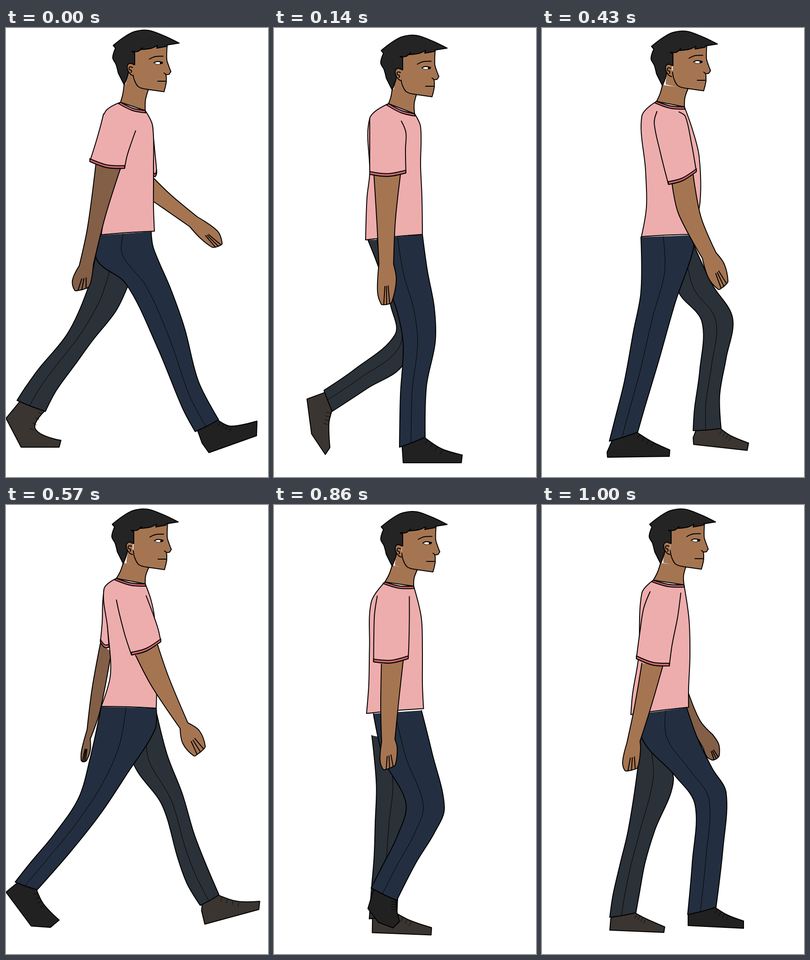
An HTML page with a canvas that plays this animation: 572 by 979 pixels, repeating every 1140 ms.

```html
<!DOCTYPE html>
<html lang="en">
<head>
<meta charset="utf-8">
<title>Walk cycle</title>
<style>
html, body { margin: 0; width: 100%; height: 100%; overflow: hidden; background: #fff; }
canvas { display: block; }
</style>
</head>
<body>
<canvas id="stage" width="572" height="979"></canvas>
<script>
const ctx = document.getElementById('stage').getContext('2d');
const LOOP = 1140;
const SKIN = '#a57552', SHADE = '#835f47', PINK = '#eeadad', TRIM = '#c7686d', HAIR = '#242424';
const NEAR = { cloth: '#232f40', shoe: '#212121' };
const FAR = { cloth: '#2b3138', shoe: '#3b3531' };

// Edges are flat x, y runs. Limbs: back edge downwards, front edge downwards (legs) or upwards (arms, sleeves).
// Hands: back knuckle, back tip, front tip, front knuckle. Shoes: heel, ball, toe, toe top, instep.
const strideBody = {
  face: [0, 0], hair: [0, 0],
  torso: { back: [250,162, 215,186, 218,280, 220,350, 208,451], front: [304,180, 320,213, 322,310, 322,390, 324,443] },
  sleeve: { back: [213,187, 206,215, 196,250, 183,291], front: [259,306, 264,280, 273,252, 283,224] },
  arm: { color: SHADE, back: [196,298, 178,435, 160,518], hand: [145,550, 150,572, 181,564, 187,545], front: [191,515, 217,410, 250,306] }
};
const strideFarArm = {
  farArm: { color: SKIN, back: [323,379, 365,408, 401,433], hand: [424,458, 450,478, 472,470, 462,443], front: [418,412, 360,364, 320,325] },
  farSleeve: { back: [320,213, 322,245, 322,285, 322,321], front: [329,315, 328,300, 325,270, 321,230] }
};
const strideLegs = {
  near: { back: [206,452, 198,505, 262,558, 330,695, 385,828, 413,880], front: [317,444, 322,480, 360,570, 390,655, 420,770, 464,854], shoe: [428,905, 443,926, 547,889, 548,857, 490,868] },
  far: { back: [196,494, 178,570, 135,665, 70,745, 40,787, 24,812], front: [267,560, 240,617, 190,680, 150,735, 110,790, 86,836], shoe: [0,851, 33,914, 116,914, 120,899, 64,874] }
};

const passBody = {
  face: [0, 11], hair: [0, 11],
  torso: { back: [250,165, 209,197, 209,317, 203,370, 200,462], front: [307,187, 320,215, 320,300, 323,370, 324,450] },
  sleeve: { back: [209,197, 209,235, 209,275, 209,319], front: [288,316, 287,265, 288,228, 278,203] },
  arm: { back: [218,318, 225,430, 229,515], hand: [226,575, 234,602, 257,598, 267,550], front: [261,515, 265,420, 276,320] }
};
const passLegs = {
  near: { back: [225,460, 240,540, 268,615, 282,690, 276,800, 274,914], front: [324,450, 335,530, 350,610, 352,685, 333,780, 330,892], shoe: [281,932, 282,948, 409,948, 411,931, 365,917] },
  far: { back: [205,462, 228,521, 256,610, 264,669, 175,745, 109,790], front: [300,460, 300,540, 300,620, 283,732, 205,785, 127,836], shoe: [72,809, 82,885, 112,930, 122,915, 120,862] }
};
const swingFar = { back: [240,500, 260,590, 268,680, 262,760, 250,810, 240,846], front: [320,500, 345,590, 360,655, 342,735, 312,800, 288,868], shoe: [232,885, 262,910, 305,930, 318,920, 300,888] };

const stepBody = {
  face: [8, -2], hair: [5, 2],
  torso: { back: [250,160, 218,192, 226,310, 228,390, 217,455], front: [311,172, 328,220, 343,280, 345,380, 328,450] },
  sleeve: { back: [251,182, 245,207, 258,270, 276,341], front: [337,313, 326,250, 313,193, 299,183] },
  arm: { back: [284,340, 298,405, 350,502], hand: [364,546, 385,570, 406,552, 398,515], front: [380,490, 347,412, 330,320] }
};
const stepLegs = {
  near: { back: [216,456, 216,575, 200,660, 180,770, 160,850, 147,901], front: [324,452, 331,480, 292,595, 255,725, 225,825, 209,881], shoe: [142,925, 143,936, 278,934, 279,920, 240,902] },
  far: { back: [300,510, 297,573, 349,640, 344,750, 333,830, 330,878], front: [330,470, 372,560, 416,632, 402,720, 388,800, 391,873], shoe: [330,893, 331,908, 448,921, 451,905, 412,889] }
};

const strideBody2 = {
  face: [1, 2], hair: [-2, 4],
  torso: { back: [241,160, 214,183, 222,270, 228,370, 208,439], front: [304,172, 316,205, 324,245, 329,380, 328,443] },
  sleeve: { back: [241,207, 247,235, 260,285, 274,327], front: [338,298, 332,270, 320,235, 306,198] },
  arm: { back: [283,328, 318,395, 380,487], hand: [386,520, 410,547, 435,526, 422,492], front: [397,475, 355,375, 331,305] }
};
const strideFarArm2 = {
  farArm: { color: SHADE, back: [206,302, 188,400, 177,490], hand: [165,535, 164,557, 176,557, 184,535], front: [184,510, 205,450, 230,320] },
  farSleeve: { back: [214,183, 211,215, 210,255, 206,299], front: [225,310, 222,270, 220,230, 219,200] }
};
const strideLegs2 = {
  near: { back: [208,440, 183,555, 158,640, 105,718, 55,778, 20,822], front: [328,443, 325,490, 265,585, 205,675, 140,757, 68,839], shoe: [0,844, 55,918, 97,921, 116,905, 82,870] },
  far: { back: [290,500, 277,560, 341,655, 375,770, 395,825, 424,873], front: [329,455, 352,545, 385,630, 410,715, 435,780, 465,850], shoe: [427,885, 434,914, 552,882, 554,864, 505,864] }
};

const passBody2 = {
  face: [1, 13], hair: [-1, 15],
  torso: { back: [241,172, 207,230, 206,290, 216,370, 210,452], front: [300,180, 322,240, 325,300, 328,380, 333,447] },
  sleeve: { back: [215,208, 217,250, 222,300, 229,349], front: [308,319, 305,298, 295,258, 288,207] },
  arm: { back: [251,348, 264,440, 285,513], hand: [287,552, 296,574, 321,560, 323,525], front: [314,507, 306,420, 300,330] }
};
const passLegs2 = {
  near: { back: [208,452, 222,535, 260,645, 250,672, 160,735, 90,790], front: [325,452, 340,530, 345,620, 350,711, 235,768, 117,836], shoe: [63,812, 80,890, 106,935, 126,922, 119,872] },
  far: { back: [212,500, 240,630, 254,672, 267,750, 270,830, 268,906], front: [300,500, 320,600, 330,680, 334,740, 331,820, 332,890], shoe: [280,907, 281,938, 420,943, 420,923, 370,911] }
};
const swingNear = { back: [217,455, 240,555, 288,650, 270,720, 235,790, 212,835], front: [322,448, 345,540, 372,660, 350,715, 310,780, 268,862], shoe: [205,880, 228,910, 260,922, 274,908, 267,880] };

const stepBody2 = {
  face: [3, 1], hair: [1, 4],
  torso: { back: [243,164, 218,192, 211,330, 198,410, 194,457], front: [310,174, 321,250, 323,330, 320,400, 320,441] },
  sleeve: { back: [236,189, 222,225, 214,275, 206,335], front: [278,351, 284,305, 296,245, 303,192] },
  arm: { back: [218,345, 202,440, 185,520], hand: [176,560, 181,579, 209,572, 215,535], front: [214,515, 238,440, 264,350] },
  farArm: { color: SHADE, back: [310,440, 330,490, 352,530], hand: [360,549, 371,556, 387,546, 386,522], front: [372,500, 345,470, 318,405] }
};
const stepLegs2 = {
  near: { back: [232,453, 218,508, 290,590, 334,653, 328,780, 318,893], front: [316,442, 340,510, 372,575, 402,627, 395,750, 380,877], shoe: [319,895, 319,917, 440,923, 440,907, 405,894] },
  far: { back: [215,505, 207,590, 188,710, 170,785, 155,850, 148,899], front: [260,530, 287,600, 246,710, 225,780, 212,850, 205,889], shoe: [150,902, 148,927, 266,932, 268,920, 225,901] }
};

// Halfway blend of two poses with the same structure.
function between(a, b) {
  if (typeof a === 'number') return (a + b) / 2;
  if (Array.isArray(a)) return a.map((value, i) => between(value, b[i]));
  if (typeof a !== 'object') return a;
  return Object.fromEntries(Object.keys(a).map(key => [key, between(a[key], b[key])]));
}

const timeline = [
  { at: 0, ...strideBody, ...strideFarArm, ...strideLegs },
  { at: 140, ...passBody, ...passLegs },
  { at: 290, ...between(passBody, stepBody), near: between(passLegs.near, stepLegs.near), far: swingFar },
  { at: 430, ...stepBody, ...stepLegs },
  { at: 570, ...strideBody2, ...strideFarArm2, ...strideLegs2 },
  { at: 710, ...passBody2, ...passLegs2 },
  { at: 860, ...between(passBody2, stepBody2), far: between(passLegs2.far, stepLegs2.far), near: swingNear },
  { at: 1000, ...stepBody2, ...stepLegs2 }
];

const points = flat => Array.from({ length: flat.length / 2 }, (_, i) => [flat[2 * i], flat[2 * i + 1]]);
const mix = (a, b, t) => [a[0] + (b[0] - a[0]) * t, a[1] + (b[1] - a[1]) * t];
const shift = (p, dx, dy) => [p[0] + dx, p[1] + dy];
const distance = (a, b) => Math.hypot(b[0] - a[0], b[1] - a[1]);
// Point a given length from a in the direction of b.
const toward = (a, b, length) => mix(a, b, length / (distance(a, b) || 1));

// Each edge is a smooth curve; edges meet at corners.
function shape(fill, width, edges, closed) {
  ctx.beginPath();
  for (const edge of edges) {
    const handle = (i, reach) => {
      const before = edge[i - 1], after = edge[i + 1];
      if (!before || !after) return edge[i];
      const span = distance(before, after) || 1;
      return shift(edge[i], (after[0] - before[0]) / span * reach, (after[1] - before[1]) / span * reach);
    };
    ctx.lineTo(...edge[0]);
    for (let i = 1; i < edge.length; i++) {
      const reach = distance(edge[i - 1], edge[i]) / 3;
      ctx.bezierCurveTo(...handle(i - 1, reach), ...handle(i, -reach), ...edge[i]);
    }
  }
  if (closed) ctx.closePath();
  if (fill) {
    ctx.fillStyle = fill;
    ctx.fill();
  }
  if (width) {
    ctx.lineWidth = width;
    ctx.stroke();
  }
}
const line = (width, ...edge) => shape(null, width, [edge]);

function drawLeg(leg, { cloth, shoe }) {
  const back = points(leg.back), front = points(leg.front);
  const [heel, ball, toe, top, instep] = points(leg.shoe);
  const hem = t => mix(back.at(-1), front.at(-1), t);
  const ankle = hem(0.97);
  shape(shoe, 2, [[hem(0.1), heel], [ball], [toe], [top, instep, ankle]]);
  const length = distance(ankle, instep);
  for (const t of [0.2, 0.5, 0.8, 1.1]) {
    const [x, y] = mix(ankle, instep, t);
    const nx = (ankle[1] - instep[1]) / length, ny = (instep[0] - ankle[0]) / length;
    line(1, [x + nx * 2, y + ny * 2], [x + nx * 11, y + ny * 11]);
  }
  const hemCurve = [back.at(-1), shift(hem(0.5), 0, 1), front.at(-1)];
  shape(cloth, 2, [back, hemCurve, [...front].reverse()]);
  line(1, ...back.map((p, i) => mix(p, front[i], 0.45)));
}

function drawArm({ color = SKIN, ...arm }) {
  const back = points(arm.back), front = points(arm.front);
  const [knuckleBack, tipBack, tipFront, knuckleFront] = points(arm.hand);
  const wrist = mix(back.at(-1), front[0], 0.5);
  const tip = t => {
    const p = mix(tipBack, tipFront, t);
    return toward(p, wrist, -12 * t * (1 - t));
  };
  shape(color, 2, [back, [back.at(-1), knuckleBack, tipBack, tip(0.3), tip(0.65), tipFront, knuckleFront, front[0]], front]);
  for (const t of [0.25, 0.52, 0.8]) {
    line(2, tip(t), toward(tip(t), wrist, distance(tip(t), wrist) * 0.45));
  }
}

function drawSleeve(sleeve) {
  const back = points(sleeve.back), front = points(sleeve.front);
  const hem = [back.at(-1), shift(mix(back.at(-1), front[0], 0.5), 0, 6), front[0]];
  shape(PINK, 2, [back, hem, front]);
  shape(TRIM, 2, [hem, hem.map(p => shift(p, 0, -6)).reverse()], true);
}

function drawTorso({ torso, face, hair }) {
  const back = points(torso.back), front = points(torso.front);
  const left = back[0], right = front[0];
  const nape = shift(hair, 258, 122), chin = shift(face, 311, 134);
  const throat = shift(mix(right, chin, 0.5), -3, 0);
  shape(SKIN, 2, [[nape, shift(mix(nape, left, 0.5), 1, 2), left], [right, throat, chin]]);
  const collar = [left, shift(mix(left, right, 0.5), 0, 4), right];
  const hem = [front.at(-1), shift(mix(front.at(-1), back.at(-1), 0.5), 0, -1), back.at(-1)];
  shape(PINK, 2, [[...back].reverse(), collar, front, hem]);
  shape(TRIM, 2, [collar, [shift(right, 1, 5), shift(collar[1], -1, 5), shift(left, -4, 3)]], true);
}

function drawHead({ face, hair }) {
  ctx.save();
  ctx.translate(...face);
  const part = (fill, width, closed, ...edges) => shape(fill, width, edges.map(points), closed);
  part(SKIN, 0, true, [262,119, 266,95], [282,95, 300,134], [262,125]);
  part(SKIN, 2, false, [279,45], [352,37, 351,68, 355,82, 360,95], [356,101, 349,102], [350,106, 350,118], [348,128, 345,139], [310,134, 289,128, 280,113, 277,98]);
  part(null, 2, false, [313,68, 325,62.5, 343,61.5]);
  part('#fff', 1, true, [323,76, 329,73, 340,74], [339,78, 331,79.5, 323,76]);
  part('#000', 0, true, [336,74], [342,74], [342,78], [336,79]);
  part(null, 2, false, [323,76, 330,73, 342,75]);
  part(null, 2, false, [345,98, 349,101]);
  part(null, 2, false, [331,116, 350,116]);
  ctx.restore();

  ctx.save();
  ctx.translate(...hair);
  part(HAIR, 2, true, [234,38, 256,21, 280,8, 310,5, 345,17, 378,33], [352,37], [351,40, 329,44], [331,38, 318,44, 296,47], [298,43, 288,51, 275,51], [281,54, 281,80], [266,80, 267,98, 258,124], [245,98, 240,79, 233,65, 239,44]);
  part(SKIN, 2, false, [279,80, 271,77, 265,82, 266,92, 272,101, 278,104]);
  part(null, 2, false, [276,86, 270,85, 269,90, 274,93, 273,97]);
  ctx.restore();
}

ctx.lineJoin = ctx.lineCap = 'round';
ctx.strokeStyle = '#000';
const start = performance.now();

function render() {
  const time = (performance.now() - start) % LOOP;
  const pose = timeline.findLast(({ at }) => at <= time);
  ctx.fillStyle = '#fff';
  ctx.fillRect(0, 0, 572, 979);
  if (pose.farArm) drawArm(pose.farArm);
  if (pose.farSleeve) drawSleeve(pose.farSleeve);
  drawLeg(pose.far, FAR);
  drawLeg(pose.near, NEAR);
  drawTorso(pose);
  drawArm(pose.arm);
  drawSleeve(pose.sleeve);
  drawHead(pose);
  requestAnimationFrame(render);
}
render();
</script>
</body>
</html>
```
